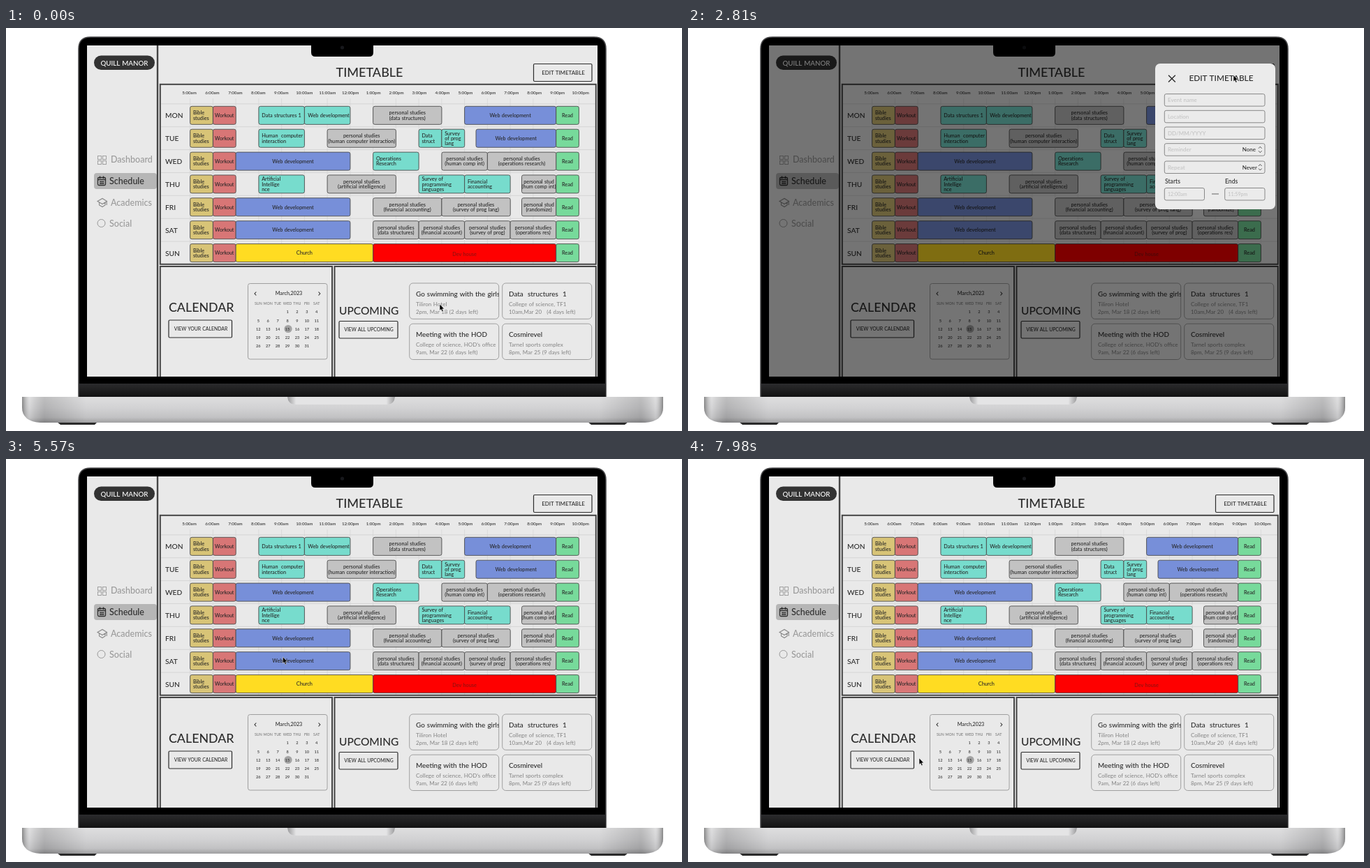
An HTML page for the animation above (8000 ms loop, 968x578 px).

```html
<!DOCTYPE html>
<html lang="en">
<head>
<meta charset="utf-8">
<title>Timetable</title>
<style>
html, body { margin: 0; width: 100%; height: 100%; overflow: hidden; background: #fff; }
svg { display: block; width: 100%; height: 100%; }
text { font-family: Lato, "Open Sans", sans-serif; font-weight: 500; word-spacing: .06em; white-space: pre; }
</style>
</head>
<body>
<svg id="stage" viewBox="0 0 968 578">
  <defs>
    <linearGradient id="metal" x2="0" y2="1">
      <stop offset="0" stop-color="#d6d6d7"/><stop offset=".45" stop-color="#c6c6c8"/>
      <stop offset=".8" stop-color="#b2b2b4"/><stop offset="1" stop-color="#88888a"/>
    </linearGradient>
    <linearGradient id="sides">
      <stop offset="0" stop-color="#555" stop-opacity=".6"/><stop offset=".012" stop-color="#fff" stop-opacity=".25"/>
      <stop offset=".035" stop-color="#555" stop-opacity=".18"/><stop offset=".1" stop-color="#fff" stop-opacity=".2"/>
      <stop offset=".9" stop-color="#fff" stop-opacity=".2"/><stop offset=".965" stop-color="#555" stop-opacity=".18"/>
      <stop offset=".988" stop-color="#fff" stop-opacity=".25"/><stop offset="1" stop-color="#555" stop-opacity=".6"/>
    </linearGradient>
    <linearGradient id="lip">
      <stop offset="0" stop-color="#9a9a9c"/><stop offset=".08" stop-color="#e4e4e5"/>
      <stop offset=".92" stop-color="#e4e4e5"/><stop offset="1" stop-color="#9a9a9c"/>
    </linearGradient>
    <linearGradient id="chin" x2="0" y2="1">
      <stop offset="0" stop-color="#2b2b2d"/><stop offset="1" stop-color="#111"/>
    </linearGradient>
    <clipPath id="card"><path d="M577 366H706V418H577Z"/></clipPath>
  </defs>
  <g id="laptop"></g>
  <g id="page"></g>
  <g id="modal"></g>
  <path id="arrow" d="M0 0V9.2L2 7.5 3.5 10.8 5.1 10.1 3.7 6.9 6.4 6.7Z" stroke="#fff" stroke-width=".5"/>
  <path id="hand" d="M-1.2 1.1a1.1 1.1 0 0 1 2.3 0V5l3.7 .8q1.5 .4 1.3 2l-.8 5.2H-.2l-3.1-4.4q.4-1.4 2.1-.1Z"
    fill="#fff" stroke="#111" stroke-width=".9" stroke-linejoin="round"/>
</svg>
<script>
const $ = id => document.getElementById(id);
const INK = '#2c2c2c', PALE = '#9a9a9a', LINE = '#454545';

const text = (x, y, s, size, o = {}) =>
  `<text x="${x}" y="${y}" font-size="${size}" fill="${o.fill || INK}" font-weight="${o.w || 500}" ` +
  `text-anchor="${o.at || 'start'}" ${o.more || ''}>${s}</text>`;
const mid = (x, y, s, size, o = {}) => text(x, y, s, size, { ...o, at: 'middle' });
const box = (x, y, w, h, fill, stroke = 'none', sw = 1, r = 0, more = '') =>
  `<rect x="${x}" y="${y}" width="${w}" height="${h}" rx="${r}" fill="${fill}" stroke="${stroke}" stroke-width="${sw}" ${more}/>`;
const path = (d, stroke, sw = 1, fill = 'none') =>
  `<path d="${d}" fill="${fill}" stroke="${stroke}" stroke-width="${sw}"/>`;

function laptop() {
  return path('M73 565H131L127 569H78ZM833 565H891L886 569H838Z', 'none', 0, '#2a2a2a') +
    path('M104 530V30Q104 13 121 13H842Q859 13 859 30V530Z', '#4a4a4c', 1.6, '#000') +
    box(105, 510, 753.5, 20, 'url(#chin)') +
    ['metal', 'sides'].map(g =>
      path('M23 529H941V544Q941 564 915 566H49Q23 564 23 544Z', 'none', 0, `url(#${g})`)).join('') +
    path('M403 529H557Q556 540 546 540H414Q404 540 403 529Z', 'none', 0, 'url(#lip)') +
    box(116, 25, 731, 475, '#e9e9e9') +
    path('M437 24H526V35Q526 41 520 41H443Q437 41 437 35Z', 'none', 0, '#000') +
    '<circle cx="481.5" cy="28" r="2.6" fill="#17181c"/>';
}

function sidebar() {
  const item = (x, y, s, o) => text(x, y, s, 12.5, { fill: PALE, w: 400, ...o });
  let s = box(126, 39.5, 87, 20.5, '#333', 'none', 0, 10.2) +
    mid(169.5, 53.6, 'QUILL MANOR', 9.8, { fill: '#fff', w: 700 }) +
    box(126, 208, 90, 23, '#b6b6b6', 'none', 0, 4) +
    item(150, 193.3, 'Dashboard') + item(148, 223.8, 'Schedule', { fill: INK, w: 700 }) +
    item(150, 254.5, 'Academics') + item(148, 285, 'Social');
  for (const x of [131.5, 138.5]) for (const y of [183.5, 190.5]) s += box(x, y, 5, 5, 'none', PALE, .9);
  return s + box(131.5, 214.5, 11, 11, 'none', INK, 1.3, 1.5) +
    path('M131.5 217.5H142.500M134.500 212.500V216M139.500 212.500V216', INK, 1.4) +
    path('M134 220.500H140.500M134 223H140.500', INK, 1.3) +
    path('M131 248.500L138 244.500 144.500 248.500 138 252.500ZM133.500 250.500V254L138 256.500 142 254V250.500M144.200 249V254', '#888', 1.1) +
    '<circle cx="136.500" cy="280" r="5.500" fill="none" stroke="#999"/>';
}

const COLORS = { k: '#d8c477', p: '#d87676', g: '#77da9b', t: '#77dccd', b: '#778fd9', s: '#c2c2c2', y: '#ffdc22', r: '#fe0000' };
const Web = 'b 2-7 Web development';
// colour, hours after 5am, lines split by /
const WEEK = {
  MON: ['t 3-5 Data structures 1', 't 5-7 Web development', 's 8-11 (data structures)', 'b 12-16 Web development'],
  TUE: ['t 3-5 Human  computer/interaction', 's 6-9 (human computer interaction)', 't 10-11 Data/struct',
    't 11-12 Survey/of prog/lang', 'b 12.5-16 Web development'],
  WED: [Web, 't 8-10 Operations/Research', 's 11-13 (human comp int)', 's 13-16 (operations research)'],
  THU: ['t 3-5 Artificial/Intellige/nce', 's 6-9 (artificial intelligence)', 't 10-12 Survey of/programming/languages',
    't 12-14 Financial/accounting', 's 14.5-16 (hum comp int)'],
  FRI: [Web, 's 8-11 (financial accounting)', 's 11-14 (survey of prog lang)', 's 14.5-16 (randomize)'],
  SAT: [Web, 's 8-10 (data structures)', 's 10-12 (financial account)', 's 12-14 (survey of prog)', 's 14-16 (operations res)'],
  SUN: ['y 2-8 Church', 'r 8-16 Dev house']
};
const DAILY = ['k 0-1 Bible/studies', 'p 1-2 Workout', 'g 16-17 Read'];
const hourX = h => 263.6 + 32.75 * h;

function block(spec, y) {
  const [, c, from, to, label] = spec.match(/^(\w) ([\d.]+)-([\d.]+) (.*)$/);
  const x = hourX(+from), w = hourX(+to) - x, lines = label.split('/');
  if (c === 's') lines.unshift(w < 50 ? 'personal stud' : 'personal studies');
  const left = c === 'k' || c === 't' && !label.startsWith('Data structures');
  const tx = left ? x + (label[0] === 'W' ? 5 : 4.300) : x + w / 2;
  return box(x.toFixed(1), y, w.toFixed(1), 26, COLORS[c], '#4c4c4c', .9, 2.5) + lines.map((s, i) =>
    text(tx, y + (c === 'r' ? 17.8 : 15.7) - 3.6 * (lines.length - 1) + 7.2 * i, s, c === 'p' ? 7 : 7.3,
      { at: left ? 'start' : 'middle', fill: c === 'r' ? '#8e1010' : '#262626' })).join('');
}

function timetable() {
  let s = mid(520.5, 70.3, 'TIMETABLE', 18) +
    box(755.5, 51.5, 83.5, 25, 'transparent', INK, 1.2, 1.5) +
    box(755.5, 51.5, 83.5, 25, '#b9b9b9', INK, 1.2, 1.5, 'id="editHover"') +
    mid(798, 67, 'EDIT TIMETABLE', 7.9);
  for (let i = 0; i < 18; i++) {
    const h = (i + 4) % 12 + 1;
    s += path(`M${hourX(i)} 101V338`, '#d5d5d5', .7) +
      mid(262.5 + 32.95 * i, 95, `${h}:00${i < 7 ? 'am' : 'pm'}`, 6.2, { w: 700 });
  }
  Object.entries(WEEK).forEach(([day, list], i) => {
    const y = +(112.3 + 32.88 * i).toFixed(1);
    s += path(`M222 ${y - 3.5}H844`, '#d0d0d0', .8) + text(228, y + 17, day, 10.2, { w: 700 }) +
      [...DAILY, ...list].map(b => block(b, y)).join('');
  });
  return s + box(220.8, 80.8, 624, 258, 'none', LINE, 2) + path('M217 25V500', LINE, 2.4) +
    path('M220.800 500V342H467V500M470.500 500V342H844.800V500', LINE, 2);
}

function calendar() {
  let s = text(233, 407.3, 'CALENDAR', 17.8) + box(233, 419, 90.5, 25, 'none', INK, 1.2, 1.5) +
    mid(279, 434, 'VIEW YOUR CALENDAR', 6.85) +
    box(346.5, 366.5, 113.5, 108.5, 'none', '#8d8d8d', .8, 3) +
    path('M358.300 378.500L356 381 358.300 383.500M447.500 378.500L449.800 381 447.500 383.500', INK, 1.1) +
    mid(405, 383, 'March,2023', 7.2) + '<circle cx="404" cy="431.500" r="5.600" fill="#a3a3a3"/>';
  const col = i => 361.3 + 13.9 * i;
  'SUN MON TUE WED THU FRI SAT'.split(' ').forEach((d, i) => s += mid(col(i), 397, d, 5.3, { fill: '#777' }));
  for (let d = 1; d < 32; d++) s += mid(col((d + 2) % 7), 409.4 + 12.1 * Math.floor((d + 2) / 7), d, 5.6, { w: 700 });
  return s;
}

function upcoming() {
  const cards = [
    ['Go swimming with the girls', 'Tiliron Hotel', '2pm, Mar 18 (2 days left)'],
    ['Data  structures  1', 'College of science, TF1', '10am,Mar 20   (4 days left)'],
    ['Meeting with the HOD', 'College of science, HOD’s office', '9am, Mar 22 (6 days left)'],
    ['Cosmirevel', 'Tarnel sports complex', '8pm, Mar 25 (9 days left)']
  ];
  const soft = { fill: '#8b8b8b', w: 400 };
  return text(477, 410.8, 'UPCOMING', 15.5) +
    box(477, 420.5, 84, 24.5, 'transparent', INK, 1.2, 1.5) +
    box(477, 420.5, 84, 24.5, '#b9b9b9', INK, 1.2, 1.5, 'id="viewHover"') +
    mid(519.5, 435.2, 'VIEW ALL UPCOMING', 6.8) +
    cards.map(([a, b, c], i) => {
      const x = 577.7 + 133 * (i % 2), y = 366 + 58.2 * (i >> 1);
      return box(x, y, 128, 51.3, 'none', '#8d8d8d', .8, 5) +
        text(x + 9.3, y + 19.2, a, 9.9, { more: i ? '' : 'clip-path="url(#card)"' }) +
        text(x + 9.3, y + 32.6, b, 8, soft) + text(x + 9.3, y + 43.9, c, 7.9, soft);
    }).join('');
}

function modal() {
  const hint = (x, y, s, size = 8) => text(x, y, s, size, { fill: '#c3c3c3', w: 400 });
  const field = (x, y, w) => box(x, y, w, 17.5, 'none', '#7d7d7d', .9, 2.5);
  let s = box(116, 25, 731, 475, '#000', 'none', 0, 0, 'opacity=".5"') +
    box(669, 51, 172, 209, '#ebebeb', 'none', 0, 7) +
    box(683.5, 64, 18.5, 18, '#b4b4b4', 'none', 0, 2, 'id="closeHover"') +
    path('M688 67.800L697.800 77.600M697.800 67.800L688 77.600', INK, 1.4) +
    mid(763.5, 76.4, 'EDIT TIMETABLE', 11.8);
  ['Event name', 'Location', 'DD/MM/YYYY', 'Reminder', 'Repeat'].forEach((label, i) => {
    const y = 94.600 + 23.7 * i + (i > 3 ? 1.6 : 0);
    s += field(682.3, y, 143.7) + hint(687, y + 11.7, label);
    if (i > 2) s += text(i > 3 ? 815 : 813, y + 11.6, i > 3 ? 'Never' : 'None', 8, { at: 'end' }) +
      path(`M817 ${y + 7}l2.300-2.500 2.300 2.500M817 ${y + 10.5}l2.300 2.500 2.300-2.500`, '#444', .9);
  });
  return s + text(683, 223, 'Starts', 8.6) + text(769, 223, 'Ends', 8.6) +
    field(682.3, 229.5, 57.2) + field(768.7, 229.5, 57.3) +
    hint(687, 241, '12:00am', 7.1) + hint(773.3, 241, '11:59pm', 7.1) + path('M750 238H760', '#555', .9);
}

$('laptop').innerHTML = laptop();
$('page').innerHTML = sidebar() + timetable() + calendar() + upcoming();
$('modal').innerHTML = modal();

// start, end, steps, then a cubic path for the pointer
const MOVES = [
  [140, 180, 2, 621, 396, 620, 386, 619, 377, 618, 367],
  [500, 500, 1, 618, 367, 618, 366, 618, 364, 618, 363],
  [900, 1700, 11, 618, 363, 550, 330, 550, 200, 740, 120],
  [1780, 2100, 5, 740, 120, 765, 106, 778, 92, 781, 79],
  [2240, 2310, 2, 781, 79, 781, 75, 781, 71, 781, 67.5],
  [3470, 3950, 7, 781.5, 68, 750, 68, 715, 72, 690, 74],
  [5100, 5870, 11, 690, 74, 600, 70, 197, 360, 484, 402],
  [5940, 6270, 5, 484, 402, 500, 408, 515, 416, 520, 425],
  [7270, 7500, 4, 520, 425, 530, 465, 515, 466, 490, 446],
  [7660, 7980, 5, 490, 446, 430, 440, 370, 432, 331, 429]
];
const LOOP = 8000;
const between = (t, a, b) => t >= a && t < b;
const ramp = (t, a, b) => Math.max(0, Math.min(1, (t - a) / (b - a)));

function pointer(t) {
  const [a, b, n, ...p] = MOVES.filter(m => m[0] <= t).pop() || MOVES[0];
  const gap = n > 1 ? (b - a) / (n - 1) : 1;
  const u = t < a ? 0 : Math.min(n, Math.floor((t - a) / gap + 1e-6) + 1) / n, v = 1 - u;
  return [0, 1].map(i => v * v * v * p[i] + 3 * v * v * u * p[i + 2] + 3 * v * u * u * p[i + 4] + u * u * u * p[i + 6]);
}

function draw(t) {
  const hand = between(t, 2020, 2810) || between(t, 3870, 4610) || between(t, 6770, 7350);
  const [x, y] = pointer(t);
  for (const id of ['arrow', 'hand']) {
    $(id).setAttribute('transform', `translate(${x.toFixed(2)} ${y.toFixed(2)})`);
    $(id).style.display = (id === 'hand') === hand ? '' : 'none';
  }
  $('modal').style.display = between(t, 2810, 4530) ? '' : 'none';
  $('editHover').style.opacity = t < 4610 ? ramp(t, 2020, 2310) : 0;
  $('closeHover').style.opacity = ramp(t, 3790, 3950);
  $('viewHover').style.opacity = t < 7660 ? ramp(t, 7270, 7430) : 0;
}

const begin = performance.now();
function tick() {
  draw((performance.now() - begin) % LOOP);
  requestAnimationFrame(tick);
}
tick();
</script>
</body>
</html>
```
